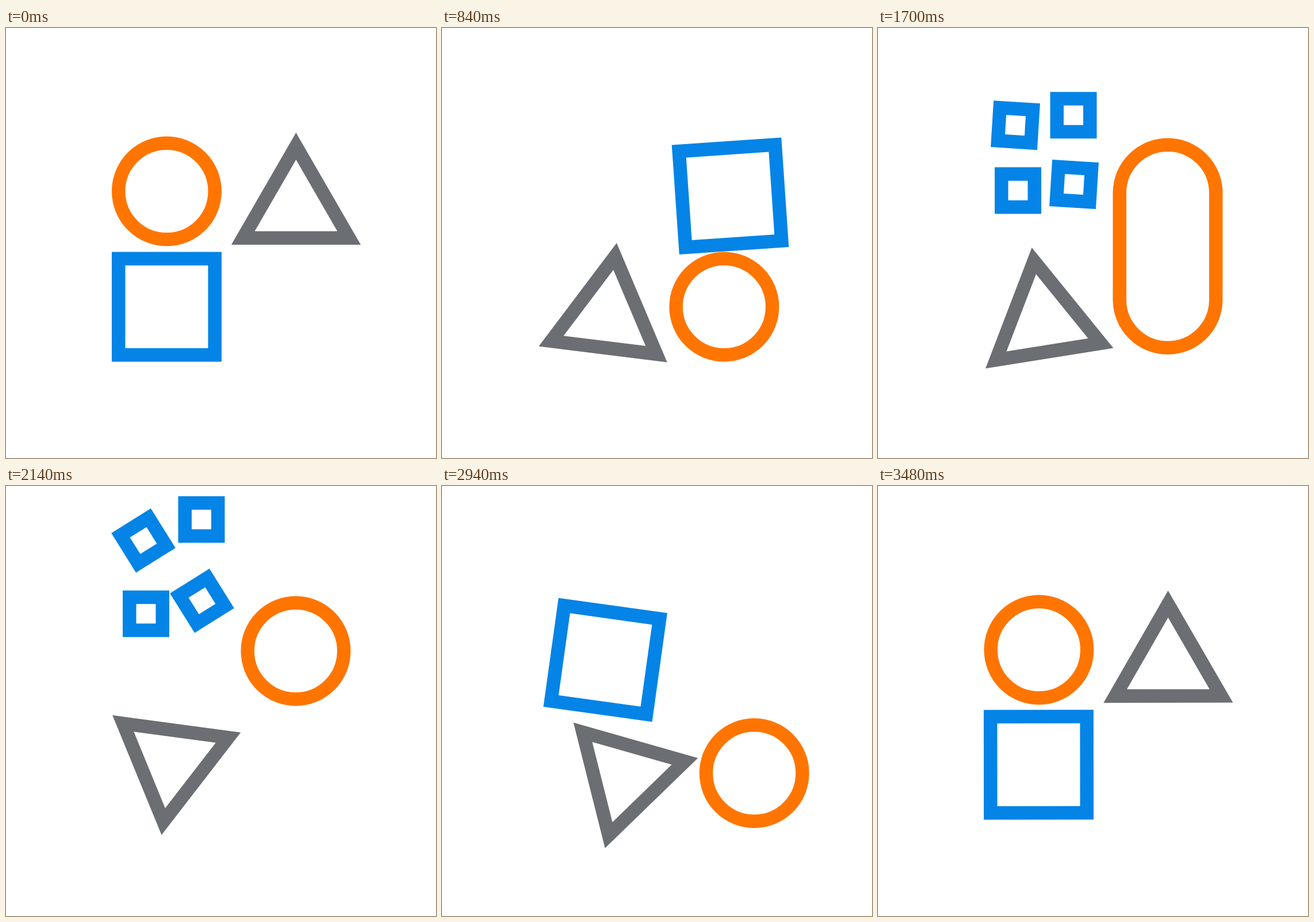
Recreate the animation shown at these times as an HTML page with a canvas. Size 748 px wide and 748 px high, loop 3.5 s.

```html
<!DOCTYPE html>
<html lang="en">
<head>
<meta charset="utf-8">
<title>Shape shuffle</title>
<style>
  html, body { margin: 0; height: 100%; overflow: hidden; background: #fff; }
  canvas { display: block; }
</style>
</head>
<body>
<canvas id="stage" width="748" height="748"></canvas>
<script>
const ctx = document.getElementById('stage').getContext('2d');
const LOOP = 3500, TICK = 20, STROKE = 23.5, SIZE = 191;
const ORANGE = '#ff7500', BLUE = '#0484e6', GRAY = '#6b6e72';
const RAD = Math.PI / 180;

const lerp = (a, b, p) => a + (b - a) * p;
const clamp = v => Math.min(1, Math.max(0, v));
const smooth = u => u * u * (3 - 2 * u);

// Same as cubic-bezier(x1, 0, x2, 1)
const bezier = (x1, x2) => s => {
  let lo = 0, hi = 1;
  for (let i = 0; i < 24; i++) {
    const u = (lo + hi) / 2, v = 1 - u;
    if (3 * x1 * u * v * v + 3 * x2 * u * u * v + u * u * u < s) lo = u; else hi = u;
  }
  return smooth(s <= 0 ? 0 : s >= 1 ? 1 : lo);
};
const glide = bezier(.5, .1), snap = bezier(.3, 0), swing = bezier(.925, .4);
const phase = (t, start, end, ease) => ease(clamp((t - start) / (end - start)));

// Orbit around the middle: radii, angles and their bulges halfway
function orbit(p, r0, r1, rBulge, a0, a1, aBulge) {
  const k = (4 * p * (1 - p)) ** 2;
  const r = lerp(r0, r1, p) + rBulge * k;
  const a = (lerp(a0, a1, p) + aBulge * k) * RAD;
  return [402 + r * Math.cos(a), 390 + r * Math.sin(a)];
}

function outline(color, x, y, angle, trace) {
  ctx.save();
  ctx.translate(x, y);
  ctx.rotate(angle * RAD);
  ctx.beginPath();
  trace();
  ctx.strokeStyle = color;
  ctx.lineWidth = STROKE;
  ctx.stroke();
  ctx.restore();
}

function square(x, y, angle, size = SIZE) {
  const side = size - STROKE;
  outline(BLUE, x, y, angle, () => ctx.rect(-side / 2, -side / 2, side, side));
}

function triangle(x, y, angle) {
  outline(GRAY, x, y, angle, () => {
    for (const a of [-90, 30, 150]) ctx.lineTo(106.5 * Math.cos(a * RAD), 106.5 * Math.sin(a * RAD));
    ctx.closePath();
  });
}

// A circle whose top and bottom halves can part
function pill(x, top, bottom) {
  const r = (SIZE - STROKE) / 2;
  outline(ORANGE, x, 0, 0, () => {
    ctx.arc(0, Math.min(top, bottom), r, Math.PI, 0);
    ctx.arc(0, Math.max(top, bottom), r, 0, Math.PI);
    ctx.closePath();
  });
}

function drawCircle(t, spin) {
  if (spin > 0) {
    const [x, y] = orbit(spin, 179, 161, 12, 55.2, -139.4, -2.5);
    return pill(x, y, y);
  }
  const down = phase(t, 0, 500, glide), right = phase(t, 500, 1000, glide);
  const y = lerp(284, 485, down);
  let top = lerp(y, 287, phase(t, 1000, 1500, glide));
  let bottom = lerp(y, 536, phase(t, 1100, 1500, glide));
  bottom = lerp(bottom, 287, phase(t, 1560, 2060, glide));
  bottom = lerp(bottom, 536, phase(t, 2140, 2460, smooth));
  top = lerp(top, 536, phase(t, 2200, 2520, smooth));
  pill(lerp(279.5, 504, right), top, bottom);
}

function drawTriangle(t, spin) {
  if (spin > 0) {
    const [x, y] = orbit(spin, 143, 129, -1, 142.7, -37.3, -10);
    return triangle(x, y, 180 + 180 * spin);
  }
  const left = phase(t, 0, 500, glide), down = phase(t, 500, 1000, glide);
  const flip = phase(t, 1575, 2360, glide);
  const x = lerp(504.5, 286.5, left) + 1.5 * down;
  const y = lerp(312, 515, down) - 38 * flip ** .7;
  triangle(x, y, -120 * (left + down) - 180 * flip);
}

// Small squares: x, resting y, jump height, turn
const PIECES = [
  [239, 236, 150, 90], [340, 236, 189, 0],
  [243.5, 337, 122, 0], [341, 337, 146, 90]
];
const JUMP = 1590, PEAK = 2021, LAND = 2510;

function drawSquare(t, spin) {
  if (spin > 0) {
    const [x, y] = orbit(spin, 153.6, 155, -67, -137.6, -217.8, 12);
    return square(x, y, 90 * spin);
  }
  if (t >= JUMP && t < LAND) {
    const fall = (t - PEAK) / (t < PEAK ? PEAK - JUMP : LAND - PEAK);
    const turn = phase(t, JUMP, LAND, smooth);
    for (const [x, y, height, angle] of PIECES) square(x, y - height * (1 - fall * fall), angle * turn, 81);
    return;
  }
  const right = phase(t, 0, 500, snap), up = phase(t, 500, 1000, snap), left = phase(t, 1000, 1457, snap);
  const x = lerp(lerp(279.5, 501.5, right), 288.5, left);
  const y = lerp(485, 283.5, up) + 3 * phase(t, 1220, 1500, smooth);
  square(x, y, 90 * (right + up - left));
}

function draw() {
  const t = Math.floor(performance.now() % LOOP / TICK) * TICK;
  const spin = phase(t, 2600, LOOP, swing);
  ctx.fillStyle = '#fff';
  ctx.fillRect(0, 0, 748, 748);
  drawCircle(t, spin);
  drawTriangle(t, spin);
  drawSquare(t, spin);
  requestAnimationFrame(draw);
}
draw();
</script>
</body>
</html>
```
